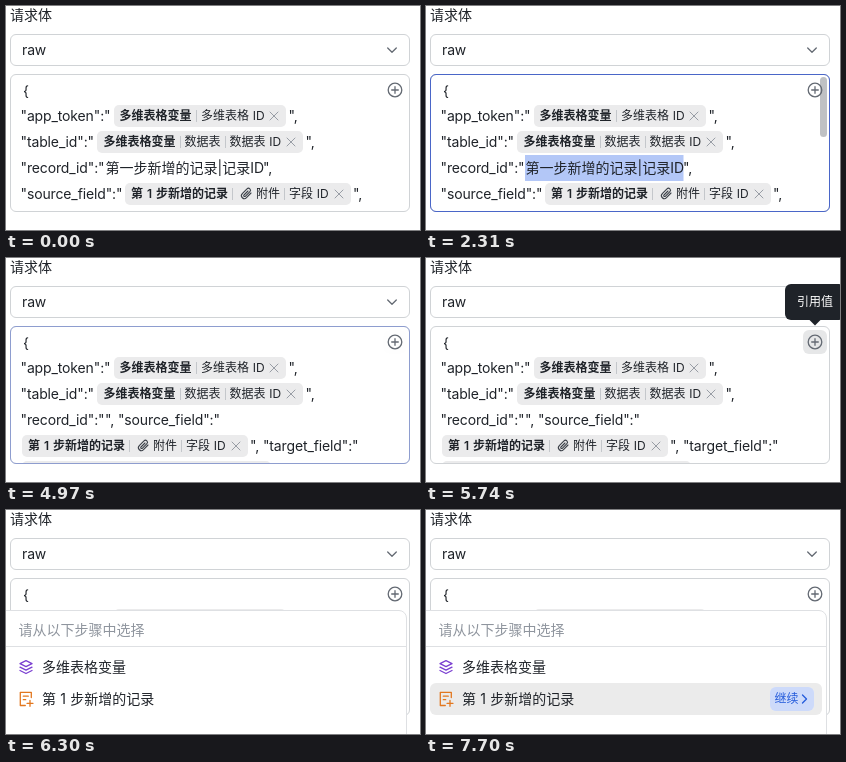
An HTML page that plays this animation: 414 by 224 pixels, repeating every 8000 ms.

```html
<!DOCTYPE html>
<html lang="zh-CN">
<head>
<meta charset="utf-8">
<title>请求体</title>
<style>
html, body { margin: 0; width: 100%; height: 100%; overflow: hidden; background: #fff; }
svg { display: block; width: 414px; height: 224px; }
text {
  font: 14px Inter, "Noto Sans CJK SC", "Noto Sans CJK", sans-serif;
  fill: #1f2329;
  white-space: pre;
  word-spacing: .4px;
}
.code { letter-spacing: -.13px; word-spacing: 0; }
.chip text, .small { font-size: 12px; }
.chip .strong { font-weight: 600; word-spacing: 1px; }
.chip rect { fill: #ebebec; }
.chip .bar { stroke: #c4c7cb; }
.line { fill: none; stroke: #646a73; stroke-width: 1.3; stroke-linecap: round; stroke-linejoin: round; }
#cross { stroke: #8f959e; stroke-width: .9; }
.chip .clip { stroke: #3c4149; stroke-width: 1.1; }
.field { fill: #fff; stroke: #d0d3d6; }
.hint { fill: #8f959e; }
.row { fill: #ebebeb; }
.blue { fill: #245bdb; }
.violet { stroke: #7a3fd0; }
.orange { stroke: #e2771f; }

/* One loop is 8 s, so 1% is 80 ms. */
.hard, .fade { animation: 8s linear infinite; }
.hard { animation-timing-function: step-end; }
#focus { animation-name: focus; }
#scrollbar { animation-name: scrollbar; }
#caretA { animation-name: caretA; }
#caretB { animation-name: caretB; }
#selection { animation-name: select; transform-origin: 99px 0; }
#before { animation-name: before; }
#after { animation-name: after; }
#plusHover { animation-name: plusHover; }
#tooltip { animation-name: tooltip; }
#popup { animation-name: popup; }
#rowOne { animation-name: rowOne; }
#rowTwo { animation-name: rowTwo; }
#nextHover { animation-name: nextHover; }

@keyframes focus {
  0%, 10.5% { opacity: 0; }
  12.25%, 61.25% { opacity: 1; }
  63%, 100% { opacity: 0; }
}
@keyframes scrollbar {
  0% { opacity: 0; }
  11.375% { opacity: .5; }
  12.25% { opacity: 1; }
  62.125%, 100% { opacity: 0; }
}
@keyframes caretA {
  0% { opacity: 0; }
  8.75% { opacity: 1; }
  15.75% { opacity: 0; }
  21.875% { opacity: 1; }
  22.75%, 100% { opacity: 0; }
}
@keyframes caretB {
  0% { opacity: 0; }
  50% { opacity: 1; }
  56.875% { opacity: 0; }
  63% { opacity: 1; }
  70%, 100% { opacity: 0; }
}
@keyframes select {
  0% { transform: scaleX(0); }
  21.875% { transform: scaleX(0); animation-timing-function: steps(8); }
  28.875%, 100% { transform: scaleX(1); }
}
@keyframes before { 0% { opacity: 1; } 49%, 100% { opacity: 0; } }
@keyframes after { 0% { opacity: 0; } 49%, 100% { opacity: 1; } }
@keyframes plusHover {
  0%, 62.125% { opacity: 0; }
  64%, 76.125% { opacity: 1; }
  78%, 100% { opacity: 0; }
}
@keyframes tooltip {
  0%, 63% { opacity: 0; }
  65.625%, 76.125% { opacity: 1; }
  78.5%, 100% { opacity: 0; }
}
@keyframes popup { 0%, 72.625% { opacity: 0; } 75.25%, 100% { opacity: 1; } }
@keyframes rowOne { 0% { opacity: 0; } 79.625% { opacity: 1; } 83.125%, 100% { opacity: 0; } }
@keyframes rowTwo { 0% { opacity: 0; } 83.125%, 100% { opacity: 1; } }
@keyframes nextHover { 0%, 93.625% { opacity: 0; } 96.25%, 100% { opacity: 1; } }
</style>
</head>
<body>
<svg viewBox="0 0 414 224">
  <defs>
    <clipPath id="inside"><rect x="5" y="69" width="398" height="136" rx="5"/></clipPath>
    <path id="cross" class="line" d="M-4-4 4 4M4-4-4 4"/>
    <g id="next">
      <text class="small blue" x="348.5" y="193.4">继续</text>
      <path class="line" style="stroke:#245bdb" d="M376.5 185l4 4-4 4"/>
    </g>
  </defs>

  <text x="4" y="14.2">请求体</text>
  <rect class="field" x="4.5" y="28.5" width="399" height="31" rx="5.5"/>
  <text class="code" x="16" y="49">raw</text>
  <path class="line" d="M381.7 42l4.3 4.3 4.3-4.3"/>

  <rect class="field" x="4.5" y="68.5" width="399" height="137" rx="5.5"/>
  <rect id="focus" class="fade" x="4.5" y="68.5" width="399" height="137" rx="5.5" fill="none" stroke="#4a66c8"/>

  <g clip-path="url(#inside)">
    <text class="code" x="17" y="89.5">{</text>

    <text class="code" x="14.5" y="114.8">"app_token":"</text>
    <g class="chip">
      <rect x="108" y="99" width="172" height="22" rx="5"/>
      <text class="strong" x="113.5" y="114.4">多维表格变量</text>
      <path class="bar" d="M190.5 104v12"/>
      <text x="195" y="114.4">多维表格 ID</text>
      <use href="#cross" x="268" y="110"/>
    </g>
    <text class="code" x="282.5" y="114.8">",</text>

    <text class="code" x="14.5" y="140.8">"table_id":"</text>
    <g class="chip">
      <rect x="91" y="125" width="206" height="22" rx="5"/>
      <text class="strong" x="97.5" y="140.4">多维表格变量</text>
      <path class="bar" d="M174.5 130v12M219.5 130v12"/>
      <text x="178.5" y="140.4">数据表</text>
      <text x="223.5" y="140.4">数据表 ID</text>
      <use href="#cross" x="285" y="136"/>
    </g>
    <text class="code" x="299.5" y="140.8">",</text>

    <g id="before" class="hard">
      <rect id="selection" class="hard" x="99" y="149" width="158.5" height="26" fill="#b3c7f7"/>
      <text x="99.5" y="167">第一步新增的记录|记录ID</text>
      <text class="code" x="257" y="166.8">",</text>
      <text class="code" x="14.5" y="192.8">"source_field":"</text>
      <g id="stepChip" class="chip">
        <rect x="119" y="177" width="226" height="22" rx="5"/>
        <text class="strong" x="125" y="192.4">第 1 步新增的记录</text>
        <path class="bar" d="M226.5 182v12"/>
        <path class="line clip" d="M245 187l-4.5 4.7a2.9 2.9 0 0 1-4.2-4.1l4.7-4.7a2 2 0 0 1 2.9 2.8l-4.6 4.6a.9.9 0 0 1-1.3-1.3l4-4"/>
        <text x="250" y="192.4">附件</text>
        <path class="bar" d="M278.5 182v12"/>
        <text x="283" y="192.4">字段 ID</text>
        <use href="#cross" x="333" y="188"/>
      </g>
      <text class="code" x="347" y="192.8">",</text>
    </g>

    <g id="after" class="hard">
      <text class="code" x="99" y="166.8">", "source_field":"</text>
      <use href="#stepChip" x="-103"/>
      <text class="code" x="244" y="192.8">", "target_field":"</text>
      <g class="chip"><rect x="16" y="203" width="249" height="22" rx="5"/></g>
    </g>

    <text class="code" x="14.5" y="166.8">"record_id":"</text>
    <rect id="caretA" class="hard" x="92" y="153" width="1" height="17" fill="#1f2329"/>
    <rect id="caretB" class="hard" x="99" y="153" width="1" height="17" fill="#1f2329"/>
  </g>

  <rect id="scrollbar" class="hard" x="394" y="71" width="7" height="60" rx="3.5" fill="#bfc1c4"/>
  <rect id="plusHover" class="fade" x="377" y="72" width="24" height="24" rx="6" fill="#e6e7e8"/>
  <g class="line">
    <circle cx="389" cy="84" r="6.8"/>
    <path d="M385.7 84h6.6M389 80.7v6.6"/>
  </g>

  <g id="popup" class="fade">
    <rect x="-20.5" y="100.5" width="421" height="160" rx="7.5" fill="#fff" stroke="#dee0e3"/>
    <text class="hint" x="12.5" y="125.2">请从以下步骤中选择</text>
    <path d="M0 136.5h400" stroke="#dee0e3"/>
    <g id="rowOne" class="hard">
      <rect class="row" x="4" y="141" width="392" height="32" rx="6"/>
      <rect x="344" y="145" width="44" height="24" rx="6" fill="#e0e9ff"/>
      <use href="#next" y="-32"/>
    </g>
    <g id="rowTwo" class="hard">
      <rect class="row" x="4" y="173" width="392" height="32" rx="6"/>
      <rect x="344" y="177" width="44" height="24" rx="6" fill="#e0e9ff"/>
      <rect id="nextHover" class="fade" x="344" y="177" width="44" height="24" rx="6" fill="#cddafa"/>
      <use href="#next"/>
    </g>
    <path class="line violet" d="M20 150.7l6 3-6 3-6-3zM14 157.2l6 3 6-3M14 160.5l6 3 6-3"/>
    <text x="36" y="162.2">多维表格变量</text>
    <path class="line orange" d="M25.3 187.5v-5.2h-11v13.2h5M17.3 186.2h5M17.3 189.7h2.4M24 190.3v6M21 193.3h6"/>
    <text x="36" y="194.2">第 1 步新增的记录</text>
  </g>

  <g id="tooltip" class="fade">
    <path d="M383 61.5h12l-6 6z" fill="#1f2329"/>
    <rect x="359" y="26" width="60" height="36" rx="6" fill="#1f2329"/>
    <text class="small" x="371" y="48.4" style="fill:#fff">引用值</text>
  </g>
</svg>
</body>
</html>
```
